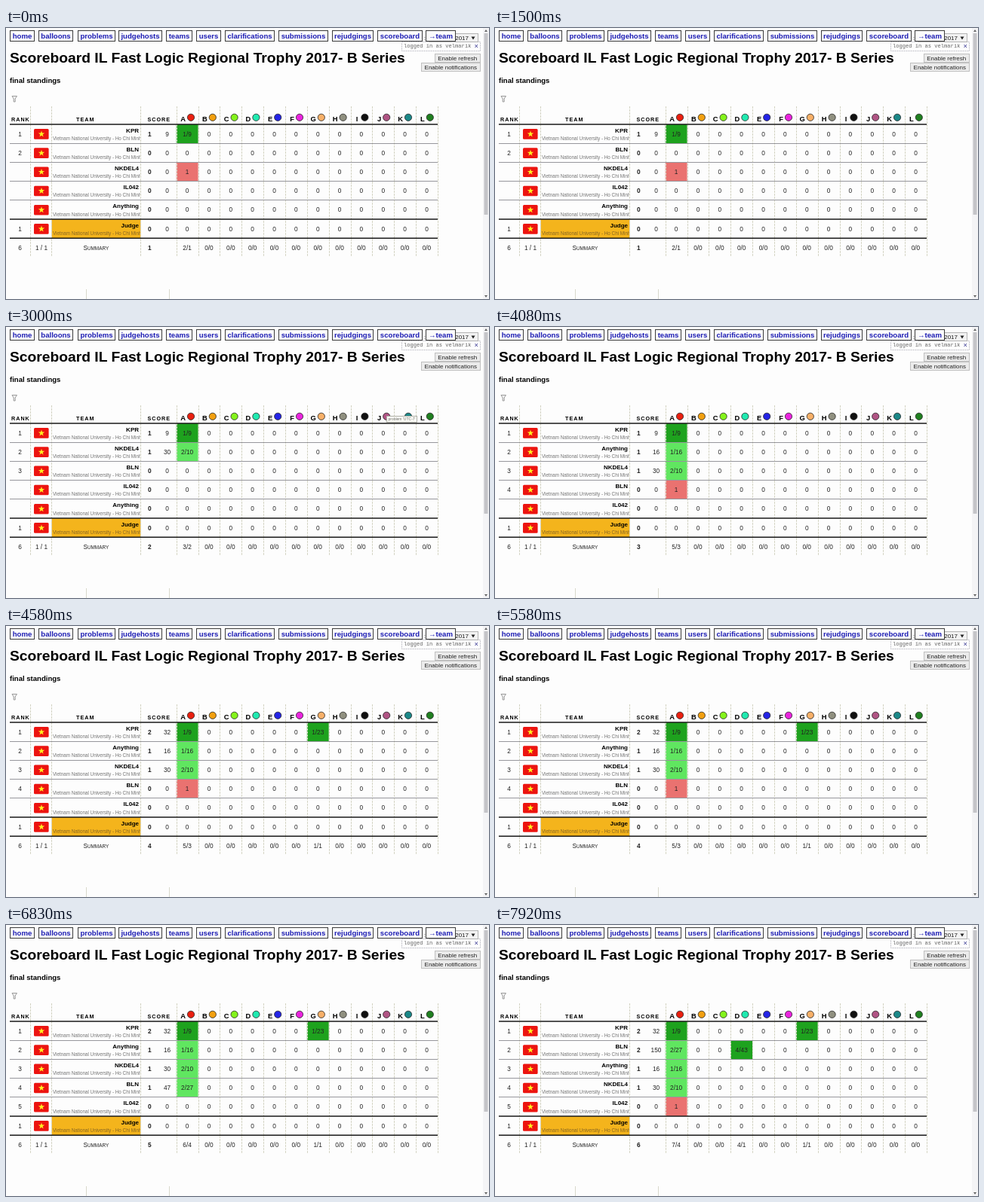
An HTML page for the animation above (8000 ms loop, 640 by 360 pixels).

```html
<!DOCTYPE html>
<html lang="en">
<head>
<meta charset="utf-8">
<title>Scoreboard</title>
<style>
html, body { margin: 0; width: 100%; height: 100%; overflow: hidden; background: #fdfdfd; }
svg { display: block; width: 640px; height: 360px; font-family: "Liberation Sans", Arial, sans-serif; }
.mono { font-family: "Liberation Mono", "DejaVu Sans Mono", monospace; }
text { white-space: pre; }
</style>
</head>
<body>
<svg id="stage" viewBox="0 0 640 360" xmlns="http://www.w3.org/2000/svg">
  <defs><clipPath id="teamCol"><rect x="60" y="100" width="118" height="210"/></clipPath></defs>
  <g id="page"></g>
  <g id="table"></g>
  <g id="lines"></g>
  <g id="tip"></g>
</svg>
<script>
const LOOP = 8000;
const COL = 28.85, COL0 = 225.7, ROW = 25.2, ROW0 = 128;
const LETTERS = "ABCDEFGHIJKL";
const BALLOONS = ["#ea2010", "#f2a010", "#84f41c", "#20eab0", "#2424e6", "#ea24de",
  "#f8b068", "#909080", "#101010", "#b05484", "#1c8888", "#208020"];
const FILL = { first: "#1ea21e", solved: "#60e660", wrong: "#ea7270" };

// Each team: name, penalty time, results; "!" marks the first solver
const STATES = [
  { at: 0, teams: [["KPR", 9, "A1/9!"], ["BLN", 0, ""], ["NKDEL4", 0, "A1"], ["IL042", 0, ""], ["Anything", 0, ""]] },
  { at: 1830, teams: [["KPR", 9, "A1/9!"], ["NKDEL4", 30, "A2/10"], ["BLN", 0, ""], ["IL042", 0, ""], ["Anything", 0, ""]] },
  { at: 3420, teams: [["KPR", 9, "A1/9!"], ["Anything", 16, "A1/16"], ["NKDEL4", 30, "A2/10"], ["BLN", 0, "A1"], ["IL042", 0, ""]] },
  { at: 4500, teams: [["KPR", 32, "A1/9! G1/23!"], ["Anything", 16, "A1/16"], ["NKDEL4", 30, "A2/10"], ["BLN", 0, "A1"], ["IL042", 0, ""]] },
  { at: 6170, teams: [["KPR", 32, "A1/9! G1/23!"], ["Anything", 16, "A1/16"], ["NKDEL4", 30, "A2/10"], ["BLN", 47, "A2/27"], ["IL042", 0, ""]] },
  { at: 7080, teams: [["KPR", 32, "A1/9! G1/23!"], ["BLN", 150, "A2/27 D4/43!"], ["Anything", 16, "A1/16"], ["NKDEL4", 30, "A2/10"], ["IL042", 0, "A1"]] }
];
const TIP_ON = 2580, TIP_OFF = 3420;

const $ = id => document.getElementById(id);
const rect = (x, y, w, h, fill, more = "") =>
  `<rect x="${x}" y="${y}" width="${w}" height="${h}" fill="${fill}" ${more}/>`;
const line = (x1, y1, x2, y2, color, w = 1, more = "") =>
  `<path d="M${x1} ${y1}L${x2} ${y2}" stroke="${color}" stroke-width="${w}" ${more}/>`;
const text = (s, x, y, size, more = "") =>
  `<text x="${x}" y="${y}" font-size="${size}" ${more}>${s}</text>`;
const MID = 'text-anchor="middle" ', END = 'text-anchor="end" ', BOLD = 'font-weight="700" ';
const rowMid = i => ROW0 + (i + 0.5) * ROW;
const colMid = i => COL0 + (i + 0.5) * COL;

function drawPage() {
  let s = rect(0, 0, 640, 360, "#fdfdfd");

  // Login panel and buttons
  s += rect(524.5, 18.5, 104, 12, "#fdfdfd", 'stroke="#c0c0c8" stroke-dasharray="2 1"');
  s += text("contest:", 523, 16, 7.1, 'class="mono" fill="#777"');
  s += rect(560.5, 7.5, 65, 11, "#f2f2f2", 'stroke="#b4b4b4"');
  s += text("2017", 613, 16, 8, END + 'fill="#222"');
  s += '<path d="M616.5 11.5h5l-2.5 4z" fill="#222"/>';
  s += text("logged in as velmarik", 527, 25.8, 7.1, 'class="mono" fill="#666"');
  s += line(621.5, 22, 625, 26, "#5050a0") + line(625, 22, 621.5, 26, "#5050a0");
  [["Enable refresh", 568, 34], ["Enable notifications", 550, 46]].forEach(([label, x, y]) => {
    s += rect(x + .5, y + .5, 628 - x, 11, "#ebebeb", 'stroke="#c0c0c0"');
    s += text(label, (x + 628.5) / 2, y + 8.9, 8, MID + 'fill="#222"');
  });

  // Menu
  [["home", 5, 38], ["balloons", 43, 89], ["problems", 95, 145], ["judgehosts", 149, 207],
   ["teams", 212, 247], ["users", 252, 285], ["clarifications", 290, 356],
   ["submissions", 361, 427], ["rejudgings", 432, 487], ["scoreboard", 492, 552],
   ["→team", 556, 596]].forEach(([label, a, b]) => {
    s += rect(a + .5, 3.5, b - a - 1, 14, "#fbfbfb", 'stroke="#3c3c3c"');
    s += text(label, (a + b) / 2, 13.7, 9.6, MID + BOLD + 'fill="#1c1cb4"');
  });

  s += text("Scoreboard IL Fast Logic Regional Trophy 2017- B Series", 5, 46.3, 19.25, BOLD);
  s += text("final standings", 5, 73, 9.55, BOLD);
  s += '<path d="M8 90.5h6.5l-2.3 3.5v4h-2v-4z" fill="#f4f4f4" stroke="#909090" stroke-width=".9"/>';

  // Header row
  [["RANK", 7], ["TEAM", 93], ["SCORE", 187.5]].forEach(([label, x]) => {
    s += text(label, x, 123.6, 7.2, BOLD + 'letter-spacing="1"');
  });
  BALLOONS.forEach((color, i) => {
    const x = 245 + i * 28.8;
    s += text(LETTERS[i], x - (i === 8 ? 9 : 7), 123.6, 9.4, BOLD + END);
    s += `<circle cx="${x}" cy="118.8" r="4.6" fill="${color}" stroke="#222" stroke-width=".8"/>`;
  });

  // Scrollbar and lower table edge
  s += rect(632, 0, 8, 360, "#f4f4f6") + rect(633.5, 7, 5, 241, "#c4c4c8");
  s += '<path d="M634 5h4l-2-3zM634 355h4l-2 3z" fill="#666"/>';
  s += line(106.5, 347, 106.5, 360, "#d8d8cc") + line(216.5, 347, 216.5, 360, "#d8d8cc");
  return s;
}

function drawLines() {
  let s = "";
  const xs = [32.5, 60.5, 178.5];
  for (let i = 0; i <= 12; i++) xs.push(Math.round(COL0 + i * COL) + .5);
  xs.forEach(x => s += line(x, 104, x, 304, "#d4d4c4", 1, 'stroke-dasharray="3 1"'));
  for (let i = 1; i < 5; i++) {
    const y = Math.floor(ROW0 + i * ROW) + .5;
    s += line(5, y, 572, y, "#96969c");
  }
  [0, 5, 6].forEach(i => {
    const y = ROW0 + i * ROW;
    s += line(5, y, 572, y, "#181818", 1.5);
  });
  return s;
}

function flag(y) {
  let d = "";
  for (let k = 0; k < 10; k++) {
    const a = k * Math.PI / 5 - Math.PI / 2, r = k % 2 ? 1.75 : 4.4;
    d += (k ? "L" : "M") + (47 + r * Math.cos(a)).toFixed(2) + " " + (y + r * Math.sin(a)).toFixed(2);
  }
  return rect(37, y - 6.8, 19.6, 13.6, "#ec1410", 'rx="1.5"') + `<path d="${d}z" fill="#fff020"/>`;
}

function parse(results) {
  const cells = {};
  results.split(" ").filter(Boolean).forEach(r => {
    const label = r.slice(1).replace("!", "");
    cells[r[0]] = {
      label, tries: parseInt(label), ok: r.includes("/"),
      kind: r.includes("!") ? "first" : r.includes("/") ? "solved" : "wrong"
    };
  });
  return cells;
}

function drawTable({ teams }) {
  const rows = [...teams, ["Judge", 0, ""]].map(([name, time, res]) => ({ name, time, cells: parse(res) }));
  rows.forEach(r => r.score = Object.values(r.cells).filter(c => c.ok).length);
  const total = rows.reduce((n, r) => n + r.score, 0);
  const ranked = rows.filter(r => r.score).length;
  const num = (v, x, y, more = "") => text(v, x, y + 3, 8.3, MID + 'fill="#222" ' + more);
  let s = "";

  rows.forEach((r, i) => {
    const y = rowMid(i), judge = i === 5;
    if (judge) s += rect(60.5, y - 12.6, 118, ROW, "#f4b41c");
    const rank = judge ? 1 : i <= ranked ? i + 1 : "";
    s += num(rank, 18.5, y) + flag(y + .3);
    s += text(r.name, 176, y - 2, 8, END + BOLD);
    s += text("Vietnam National University - Ho Chi Minh City", 62, y + 8.2, 6.3,
      `clip-path="url(#teamCol)" fill="${judge ? "#846424" : "#747474"}"`);
    s += num(r.score, 190.3, y, BOLD) + num(r.time, 213.5, y);
    [...LETTERS].forEach((letter, c) => {
      const cell = r.cells[letter];
      if (cell) s += rect(COL0 + c * COL, y - 12.6, COL, ROW, FILL[cell.kind]);
      s += num(cell ? cell.label : 0, colMid(c), y);
    });
  });

  const y = rowMid(6);
  s += num(6, 18.5, y) + num("1 / 1", 47, y) + num(total, 190.3, y, BOLD);
  s += num('S<tspan font-size="6.4">UMMARY</tspan>', 119.3, y);
  [...LETTERS].forEach((letter, c) => {
    const cells = rows.map(r => r.cells[letter]).filter(Boolean);
    const tries = cells.reduce((n, q) => n + q.tries, 0);
    s += num(tries + "/" + cells.filter(q => q.ok).length, colMid(c), y);
  });
  return s;
}

$("page").innerHTML = drawPage();
$("lines").innerHTML = drawLines();
$("tip").innerHTML = rect(504.5, 118.5, 40, 8, "#fbfbf6", 'stroke="#b0b0a8"') +
  text("problem 'UTC-7'", 524.5, 124.4, 5, MID + 'fill="#70706c"');

let shown = null;
function render(t) {
  const state = STATES.filter(s => s.at <= t).pop();
  if (state !== shown) {
    $("table").innerHTML = drawTable(state);
    shown = state;
  }
  $("tip").setAttribute("visibility", t >= TIP_ON && t < TIP_OFF ? "visible" : "hidden");
}

const start = performance.now();
function tick() {
  render((performance.now() - start) % LOOP);
  requestAnimationFrame(tick);
}
tick();
</script>
</body>
</html>
```
